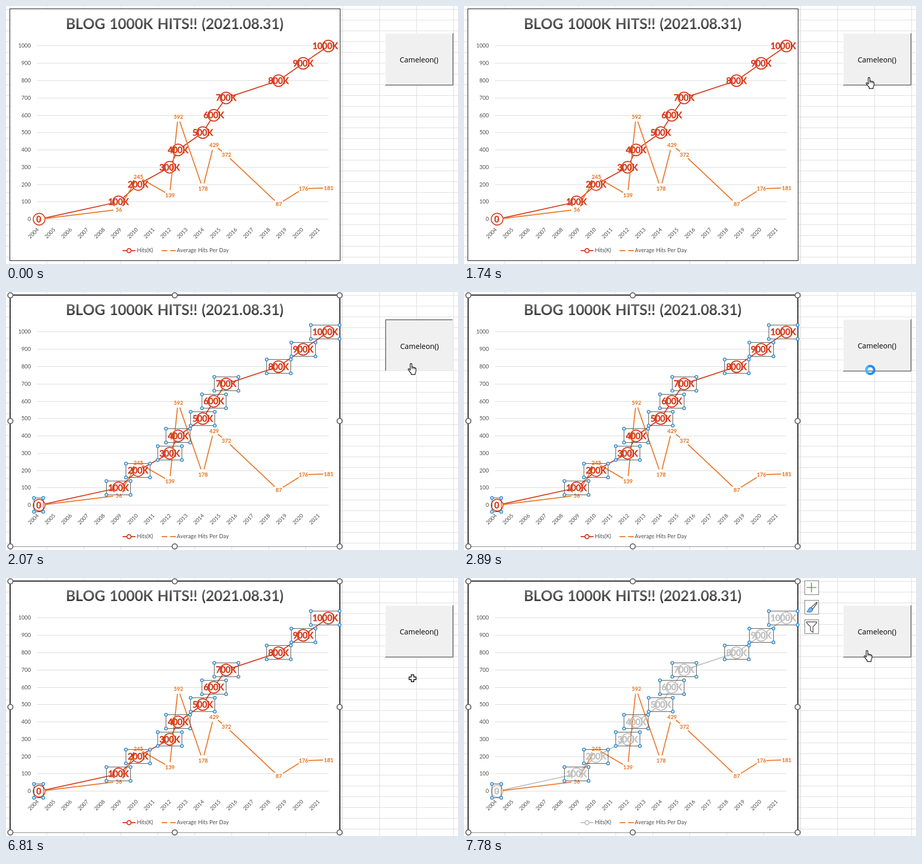
An HTML page that plays this animation: 880x503 px, repeating every 8000 ms.

```html
<!DOCTYPE html>
<html lang="en">
<head>
<meta charset="utf-8">
<title>Blog hits chart</title>
<style>
  html, body { margin: 0; width: 100%; height: 100%; overflow: hidden; background: #fff; }
  svg { display: block; --hit: #d6391a; --avg: #e8792c; }
  svg.swapped { --hit: #bfbfbf; --avg: #ed7d31; }
  text { font-family: Lato, Carlito, sans-serif; font-size: 10.5px; font-kerning: none; fill: #4c4c4c; text-anchor: middle; }
  .title { font-size: 28.5px; font-weight: 700; letter-spacing: -.2px; word-spacing: 1.8px; fill: url(#ink); }
  .end { text-anchor: end; }
  .start { text-anchor: start; word-spacing: .6px; }
  .hit-line, .hit-dot { stroke: var(--hit); stroke-width: 2; fill: none; stroke-linejoin: round; }
  .hit-dot { fill: #fff; }
  .avg-line { stroke: var(--avg); stroke-width: 2; fill: none; stroke-linejoin: round; }
  .hit-text { font-size: 16.5px; font-weight: 700; fill: var(--hit); stroke: var(--hit); stroke-width: .4; }
  .avg-text { font-weight: 700; fill: var(--avg); stroke: var(--avg); stroke-width: .15; }
  .caption { font-family: "Open Sans", "Noto Sans", sans-serif; font-size: 14.2px; fill: #000; }
  .frame-box { fill: none; stroke: #484848; }
  .knob { fill: #cfe9fb; stroke: #1b7ac4; stroke-width: 1.3; }
  .handle { fill: #fff; stroke: #636363; stroke-width: 2; }
  .tool { fill: #fff; stroke: #707070; }
</style>
</head>
<body>
<svg id="stage" width="880" height="503" viewBox="0 0 880 503">
  <defs>
    <linearGradient id="ink" gradientUnits="userSpaceOnUse" x1="0" y1="17" x2="0" y2="54">
      <stop offset="0" stop-color="#7f7f7f"/><stop offset="1" stop-color="#262626"/>
    </linearGradient>
  </defs>
  <g id="sheet" shape-rendering="crispEdges"></g>
  <g id="chart"></g>
  <g id="selection"></g>
  <g id="tools">
    <rect class="tool" x=".5" y="5.5" width="27" height="27"/>
    <rect class="tool" x=".5" y="43.5" width="27" height="27"/>
    <rect class="tool" x=".5" y="81.5" width="27" height="27"/>
    <path d="M13.5 9V28M4 18.5H23" stroke="#35a554" stroke-width="1.6"/>
    <path d="M24 47L13 57.5L16 60.5L24.5 49Z" fill="#fff" stroke="#444" stroke-width="1.3"/>
    <path d="M12.5 57.5Q9 57 7.8 61Q7 64 4 65.5Q11 68.5 14.5 65Q16.5 62.5 15.5 60.5Z" fill="#6fb5ea" stroke="#1f6fb5"/>
    <path d="M4 85.5H23.5V87.5L16.5 95V106L11.5 102.5V95L4 87.5Z" fill="#fff" stroke="#444" stroke-width="1.3"/>
  </g>
  <g id="button">
    <rect x="738" y="53" width="133" height="102" fill="#f0f0f0"/>
    <g id="raised" fill="none">
      <path d="M738.5 154V53.5H870" stroke="#fff"/>
      <path d="M739 153.5H869.5V54" stroke="#a0a0a0"/>
      <path d="M738 154.5H870.5V53" stroke="#696969"/>
    </g>
    <g id="sunken" fill="none">
      <path d="M738.5 154V53.5H870" stroke="#a0a0a0"/>
      <path d="M739.5 153V54.5H869" stroke="#696969"/>
      <path d="M739 153.5H869.5V54" stroke="#e3e3e3"/>
      <path d="M738 154.5H870.5V53" stroke="#fff"/>
    </g>
    <text id="caption" class="caption" x="804" y="109.5">Cameleon()</text>
  </g>
  <g id="hand" stroke="#000" stroke-width="1.2" stroke-linejoin="round">
    <path fill="#fff" d="M5 14V2.6Q5 .8 6.6 .8T8.2 2.6V8.2Q9.9 6.8 11 8.6Q12.8 7.6 13.8 9.6Q16.2 8.8 16.2 11.5V15Q16.2 17.5 14.6 19.5V22.4H6.8V20Q4 17 1.2 13.2Q.6 11.2 2.2 11Q3.6 11.2 5 14Z"/>
    <path fill="none" stroke-width=".9" d="M8.2 8.2V12M11 8.6V12M13.8 9.6V12.4"/>
  </g>
  <path id="cross" fill="#fff" stroke="#000" stroke-width="1.4"
    d="M-2.5 -6.8H2.5V-2.5H6.8V2.5H2.5V6.8H-2.5V2.5H-6.8V-2.5H-2.5Z"/>
  <g id="busy" fill="none" stroke-width="4.6">
    <circle r="7.7" stroke="#1f8cec"/>
    <path d="M-3.8 6.7A7.7 7.7 0 0 1 -3.8 -6.7" stroke="#3fc0f8"/>
  </g>
</svg>
<script>
const LOOP = 8000;
const get = id => document.getElementById(id);
const X = [64.5, 219, 257, 318.5, 335, 383, 404.5, 428.5, 530.5, 578.5, 627.5];
const AVG = [0, 56, 245, 139, 592, 178, 429, 372, 87, 176, 181];
const yOf = v => 415.65 - v * 0.3377;

const text = (cls, x, y, s, extra = "") => `<text class="${cls}" x="${x}" y="${y}" ${extra}>${s}</text>`;
const line = (x1, y1, x2, y2, style) => `<line x1="${x1}" y1="${y1}" x2="${x2}" y2="${y2}" ${style}/>`;
const dot = (cls, x, y, r, extra = "") => `<circle class="${cls}" cx="${x}" cy="${y}" r="${r}" ${extra}/>`;
const poly = (cls, pts) => `<polyline class="${cls}" points="${pts.join(" ")}"/>`;
const range = (n, f) => Array.from({ length: n }, (_, i) => f(i)).join("");

const rule = 'stroke="#dcdcdc"';
get("sheet").innerHTML =
  range(13, i => line(7.5 + 72 * i, 0, 7.5 + 72 * i, 503, rule)) +
  range(24, i => line(0, 6.5 + 21 * i, 880, 6.5 + 21 * i, rule));

const hits = X.map((x, i) => [x, yOf(i * 100)]);
const avgs = X.map((x, i) => [x, yOf(AVG[i])]);
const labels = hits.map(([x, y], i) => ({
  x: i === 10 ? 621.5 : i ? x : 63.7, y,
  s: i ? i * 100 + "K" : "0",
  w: i === 10 ? 56 : i ? 47 : 18
}));

get("chart").innerHTML =
  '<rect x="7.5" y="5.5" width="643" height="491" fill="#fff" stroke="#000"/>' +
  text("title", 328.3, 45, "BLOG 1000K HITS!! (2021.08.31)") +
  range(11, i => {
    const y = Math.round(yOf(i * 100) - 0.5) + 0.5;
    return line(60, y, 628, y, 'stroke="#d9d9d9"') + text("end", 48.3, y + 3.6, i * 100);
  }) +
  range(18, i => text("end", 0, 0, 2004 + i, `transform="translate(${64.6 + 32.18 * i} 436.8) rotate(-45)"`)) +
  poly("hit-line", hits) +
  hits.map(([x, y]) => dot("hit-dot", x, y, 11.3)).join("") +
  poly("avg-line", avgs) +
  avgs.map(([x, y]) => dot("", x, y, 10.3, 'fill="#fff"')).join("") +
  labels.map(l => text("hit-text", l.x, l.y + 6.2, l.s)).join("") +
  avgs.map(([x, y], i) => text("avg-text", x + 0.7, y + 4, i ? AVG[i] : "-")).join("") +
  line(227, 477, 252, 477, 'class="hit-line"') + dot("hit-dot", 239.5, 477, 4) +
  text("start", 255, 480.3, "Hits(K)") +
  line(303, 477, 330.5, 477, 'class="avg-line" stroke-dasharray="11 5.5"') +
  text("start", 332.5, 480.3, "Average Hits Per Day");

const corners = [8.5, 328.5, 649.5].flatMap(x => [6.5, 251.5, 496].map(y => [x, y]))
  .filter(([x, y]) => x !== 328.5 || y !== 251.5);
get("selection").innerHTML =
  '<path d="M8 496V6H650V496" fill="none" stroke="#1c1c1c" stroke-width="2"/>' +
  line(9, 496.5, 649, 496.5, 'stroke="#808080"') +
  corners.map(([x, y]) => dot("handle", x, y, 5)).join("") +
  labels.map(({ x, y, w }) => {
    const left = Math.floor(x - w / 2) + 0.5, top = Math.floor(y - 13.7) + 0.5;
    return `<rect class="frame-box" x="${left}" y="${top}" width="${w}" height="27"/>` +
      [left, left + w].map(a => dot("knob", a, top, 2.9) + dot("knob", a, top + 27, 2.9)).join("");
  }).join("");

// start time, pointer kind, x, y
const POINTER = [
  [0, ""],
  [490, "cross", 752, 415], [583, "cross", 755, 362], [677, "cross", 763, 286],
  [770, "cross", 773, 219], [863, "cross", 781, 174], [957, "hand", 776, 140],
  [1050, ""],
  [1450, "hand", 782, 141], [1740, "hand", 782, 138.5],
  [2872, "busy", 791, 152], [2975, "busy", 796, 178], [3077, "busy", 799, 197], [3180, "busy", 800, 204],
  [6810, "cross", 791.5, 195.5], [7590, "cross", 790, 178],
  [7685, "hand", 779, 147], [7780, "hand", 778, 140.5]
];
const show = (id, on) => get(id).setAttribute("visibility", on ? "visible" : "hidden");
const move = (id, x, y) => get(id).setAttribute("transform", `translate(${x} ${y})`);

function draw(t) {
  const [, kind, x, y] = POINTER.filter(p => p[0] <= t).pop();
  for (const id of ["hand", "cross", "busy"]) {
    show(id, id === kind);
    if (id === kind) move(id, x, y);
  }
  const pressed = t >= 1930 && t < 2770;
  show("raised", !pressed);
  show("sunken", pressed);
  move("caption", +pressed, +pressed);
  show("selection", t >= 2070);
  get("stage").classList.toggle("swapped", t >= 6910);
  show("tools", t >= 7010);
  move("tools", t < 7100 ? 660 : 663, 0);
}

function tick() {
  draw(performance.now() % LOOP);
  requestAnimationFrame(tick);
}
tick();
</script>
</body>
</html>
```
